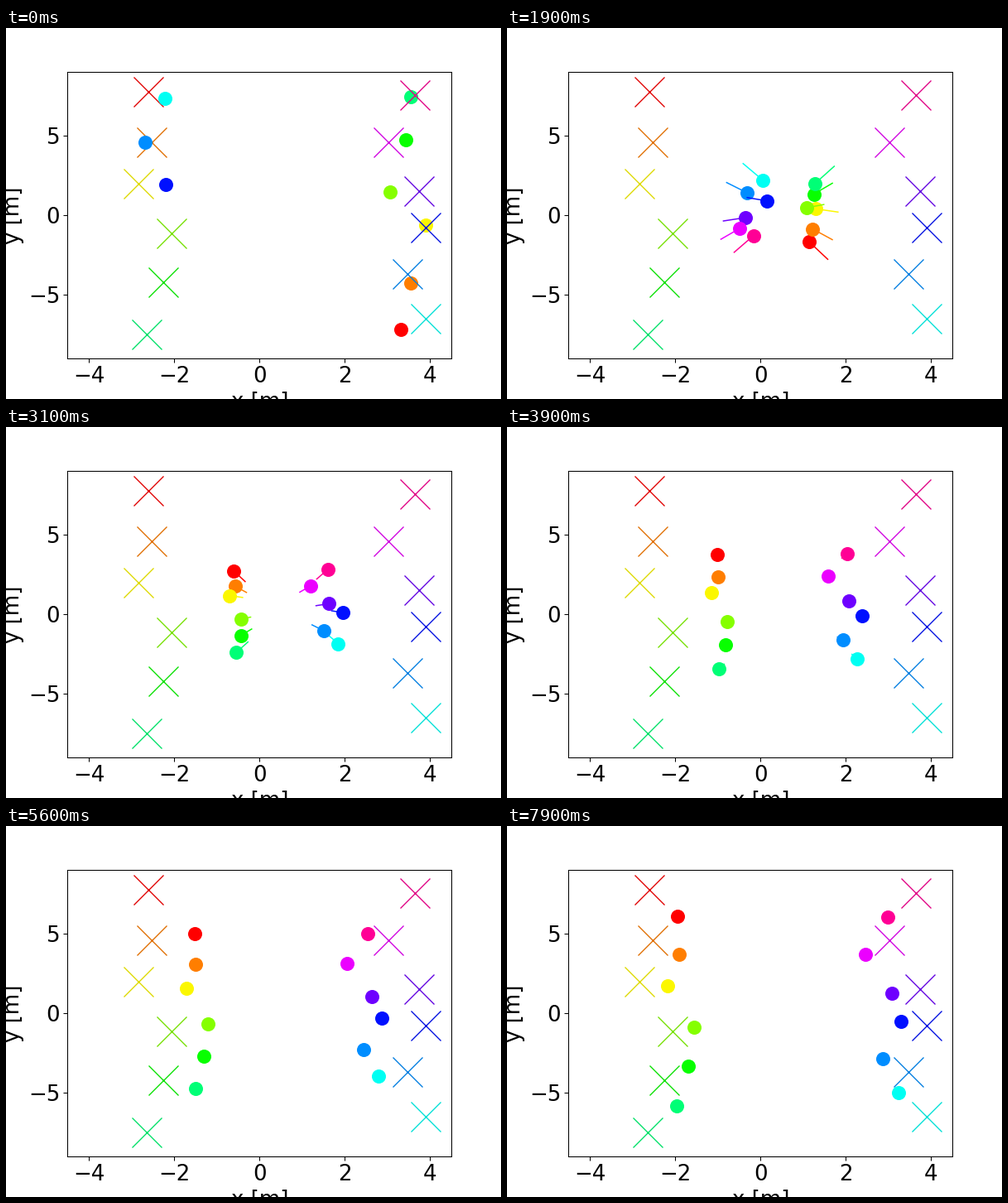
Recreate the animation shown at these times as a matplotlib script. Size 598x448 px, loop 8000 ms.

```python
import numpy as np
import matplotlib.pyplot as plt
from matplotlib.animation import FuncAnimation

W, H, DPI = 598, 448, 64
FRAMES, STEP = 80, 100
PX = 72 / DPI            # points per pixel
PT = 93.4375 / DPI       # scale for the nominal point sizes
TRAIL = 3.3              # trail length in time steps of velocity

plt.rcParams.update({
    "font.family": "DejaVu Sans",
    "font.size": 20 * PT,
    "axes.linewidth": 0.8 * PT,
    "axes.labelpad": 4 * PT,
})
for a in "xy":
    plt.rcParams.update({
        f"{a}tick.major.size": 3.5 * PT,
        f"{a}tick.major.width": 0.8 * PT,
        f"{a}tick.major.pad": 3.5 * PT,
    })

# Two facing groups; every agent crosses to a goal on the other side
START = np.array([
    (3.32, -7.17), (3.54, -4.25), (3.89, -0.60),
    (3.07, 1.48), (3.43, 4.77), (3.55, 7.48),
    (-2.22, 7.35), (-2.69, 4.61), (-2.19, 1.95),
    (-2.93, -1.20), (-2.68, -4.22), (-2.41, -6.49)])
GOAL = np.array([
    (-2.61, 7.79), (-2.52, 4.61), (-2.83, 2.00),
    (-2.07, -1.12), (-2.26, -4.20), (-2.65, -7.48),
    (3.90, -6.49), (3.47, -3.68), (3.89, -0.76),
    (3.74, 1.53), (3.02, 4.61), (3.65, 7.58)])
N = len(START)
ROUTE = GOAL - START
DIST = np.linalg.norm(ROUTE, axis=1, keepdims=True)
LAG = np.minimum(1, 10 / DIST) ** 0.12   # long routes take a little longer


def position(t):
    """Exponential approach with a burst while the groups pass each other."""
    burst = 0.49 / (1 + np.exp((25.5 - t) / 2.86))
    return GOAL - ROUTE * np.exp(-(0.0232 * t + burst) * LAG)


fig, ax = plt.subplots(figsize=(W / DPI, H / DPI), dpi=DPI)
fig.subplots_adjust(left=74.4 / W, right=538.2 / W,
                    bottom=1 - 398.9 / H, top=1 - 53.4 / H)
ax.set(xlim=(-4.5, 4.5), ylim=(-9, 9), xlabel="x [m]", ylabel="y [m]",
       xticks=range(-4, 5, 2), yticks=(-5, 0, 5))

cmap = plt.get_cmap("hsv", N + 1)
trails, discs = [], []
for i, (gx, gy) in enumerate(GOAL):
    color = np.array(cmap(i)[:3])
    trails += ax.plot([], [], color=color, lw=1.5 * PX)
    ax.plot(gx, gy, "x", color=0.88 * color, ms=36 * PX, mew=1.35 * PX)
    discs += ax.plot([], [], "o", color=color, ms=17 * PX, mew=0)


def draw(n):
    pos = position(n)
    tail = pos - TRAIL * (position(n + 0.5) - position(n - 0.5))
    for i, (trail, disc) in enumerate(zip(trails, discs)):
        trail.set_data(*zip(tail[i], pos[i]))
        disc.set_data(*zip(pos[i]))
        trail.set_visible(n > 0)
        disc.set_visible(n > 0 or i < 9)   # the last three appear late
    return trails + discs


anim = FuncAnimation(fig, draw, frames=FRAMES, interval=STEP,
                     repeat=True, repeat_delay=0)
plt.show()
```
